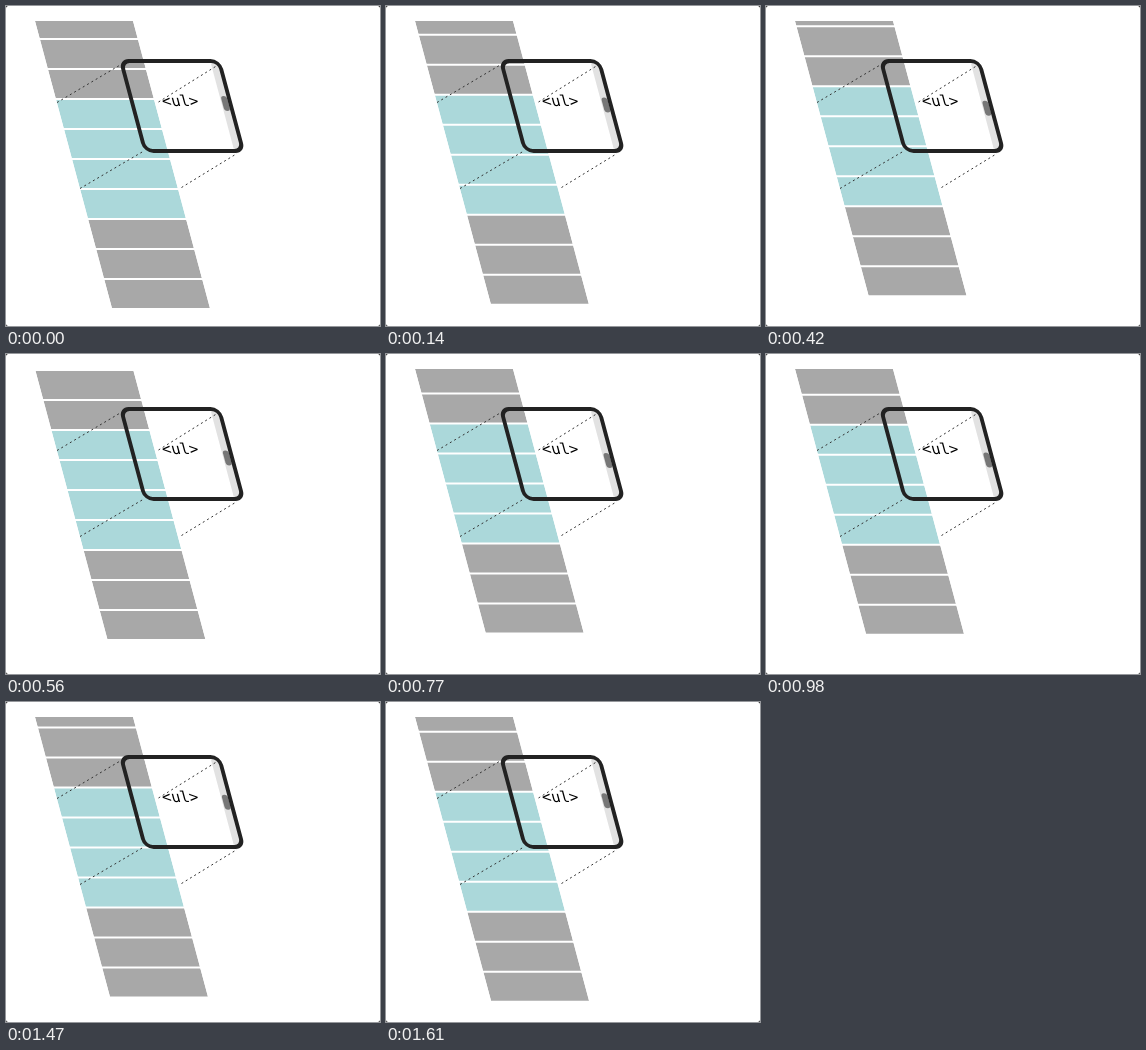
An HTML page that plays this animation: 374x320 px, repeating every 1680 ms.

```html
<!DOCTYPE html>
<html lang="en">
<head>
<meta charset="utf-8">
<title>Scrolling list</title>
<style>
  html, body { margin: 0; width: 100%; height: 100%; overflow: hidden; background: #222; }
  svg { display: block; }
  text { font: 15px "DejaVu Sans Mono", monospace; }
  .rays { stroke: #333; stroke-dasharray: 2 3; }
</style>
</head>
<body>
<svg width="374" height="320">
  <rect width="374" height="320" rx="2.5" fill="#fff"/>
  <g transform="translate(29 15) skewX(15)">
    <svg width="98" height="305"><g id="list"></g></svg>
    <rect x="164.5" y="41" width="8.5" height="88" fill="#e2e2e2"/>
    <rect id="thumb" x="165.4" y="75" width="6" height="15" rx="3" fill="#777"/>
    <text x="105.6" y="85">&lt;ul&gt;</text>
  </g>
  <path class="rays" d="M51 96.5L115 58.5M152.5 96L212 59M74 182.5L137 145.5M175.5 181.5L231 147.5"/>
  <rect transform="translate(29 15) skewX(15)" x="75.3" y="40" width="98" height="90" rx="8"
        fill="none" stroke="#222" stroke-width="4"/>
</svg>
<script>
  const LOOP = 1680, STEP = 70;
  const list = document.getElementById('list');
  const thumb = document.getElementById('thumb');

  for (let i = 0; i < 10; i++) {
    const row = document.createElementNS('http://www.w3.org/2000/svg', 'rect');
    const attrs = { y: i * 30 - 11, width: 98, height: 28, fill: i > 2 && i < 7 ? '#abd8da' : '#a8a8a8' };
    for (const name in attrs) row.setAttribute(name, attrs[name]);
    list.append(row);
  }

  function draw(now) {
    const t = Math.floor(now % LOOP / STEP) * STEP;
    // Scroll up at a steady rate, then back down
    const scroll = Math.min(0.0305 * t, 0.0299 * (1720 - t));
    list.setAttribute('transform', `translate(0 ${-scroll})`);
    thumb.setAttribute('y', 75 + scroll * 0.38);
    requestAnimationFrame(draw);
  }
  draw(0);
</script>
</body>
</html>
```
